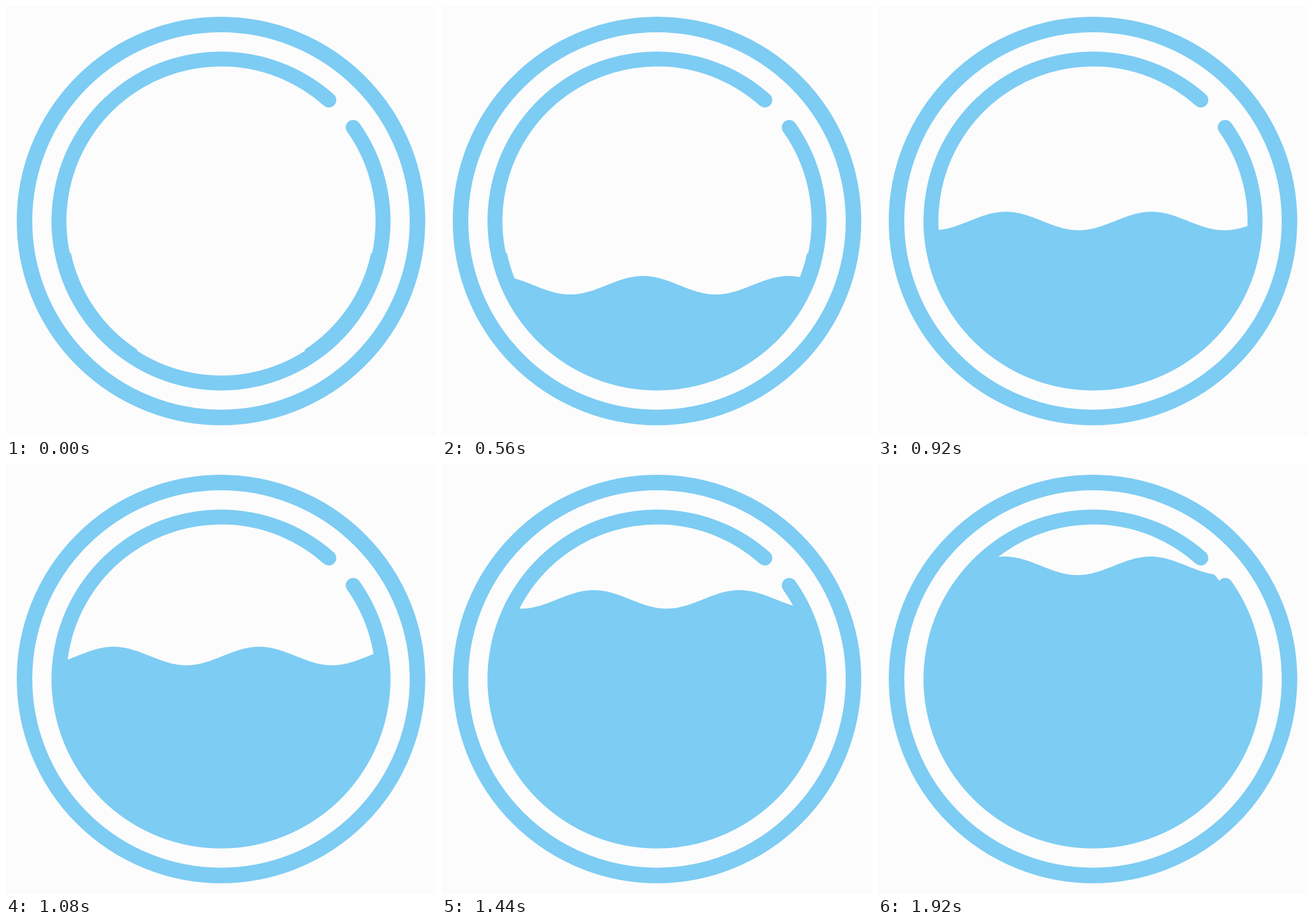
Recreate the animation shown at these times as an HTML page with a canvas. Size 720x720 px, loop 2920 ms.

```html
<!DOCTYPE html>
<html lang="en">
<head>
<meta charset="utf-8">
<title>Filling porthole</title>
<style>
  html, body { margin: 0; width: 100%; height: 100%; overflow: hidden; background: #fcfcfc; }
  canvas { display: block; width: 100vmin; height: 100vmin; }
</style>
</head>
<body>
<canvas id="stage" width="720" height="720"></canvas>
<script>
const ctx = document.getElementById('stage').getContext('2d');
const BLUE = '#7dccf3', PAPER = '#fcfcfc';
const LOOP = 2920, STEP = 40, START = 240, END = 1920;
const CENTER = 360, WAVELENGTH = 244, AMPLITUDE = 15.5;

// Path of one wave crest; velocities vx, vy are in pixels per step.
const path = [
  { t: 240,  x: 450, y: 568, vx: -15,   vy: -15 },
  { t: 320,  x: 420, y: 538, vx: -15,   vy: -15 },
  { t: 760,  x: 273, y: 388, vx: -12.5, vy: -12 },
  { t: 1080, x: 180, y: 306, vx: 0,     vy: -9.5 },
  { t: 1280, x: 217, y: 253, vx: 9,     vy: -11.5 },
  { t: 1600, x: 267, y: 180, vx: -3,    vy: -6.2 },
  { t: 1920, x: 212, y: 155, vx: 0,     vy: 0 }
];

function hermite(p0, v0, p1, v1, u) {
  const u2 = u * u, u3 = u2 * u;
  return p0 * (2 * u3 - 3 * u2 + 1) + v0 * (u3 - 2 * u2 + u)
       + p1 * (3 * u2 - 2 * u3) + v1 * (u3 - u2);
}

function crestAt(t) {
  const i = Math.max(1, path.findIndex(p => t <= p.t));
  const a = path[i - 1], b = path[i];
  const u = (t - a.t) / (b.t - a.t), steps = (b.t - a.t) / STEP;
  return {
    x: hermite(a.x, a.vx * steps, b.x, b.vx * steps, u),
    y: hermite(a.y, a.vy * steps, b.y, b.vy * steps, u)
  };
}

function ring(radius, width, from = 0, to = 360, cap = 'butt') {
  const rad = Math.PI / 180;
  ctx.beginPath();
  ctx.arc(CENTER, CENTER, radius, from * rad, to * rad);
  ctx.lineWidth = width;
  ctx.lineCap = cap;
  ctx.stroke();
}

function water(crest) {
  ctx.save();
  ctx.beginPath();
  ctx.arc(CENTER, CENTER, 268, 0, Math.PI * 2);
  ctx.clip();
  ctx.beginPath();
  ctx.moveTo(80, 640);
  for (let x = 80; x <= 640; x += 2) {
    const phase = (x - crest.x) / WAVELENGTH * Math.PI * 2;
    ctx.lineTo(x, crest.y + AMPLITUDE * (1 - Math.cos(phase)));
  }
  ctx.lineTo(640, 640);
  ctx.fill();
  ctx.restore();
}

function draw(time) {
  const t = Math.floor((time % LOOP) / STEP) * STEP;
  ctx.fillStyle = PAPER;
  ctx.fillRect(0, 0, 720, 720);
  ctx.fillStyle = ctx.strokeStyle = BLUE;
  ring(329, 26);
  ring(271.3, 25, -35.3, 311.7, 'round');
  // The lower sides of the inner ring are slightly thicker.
  ring(259, 4, 12, 57);
  ring(259, 4, 123, 168);
  if (t >= START) water(crestAt(Math.min(t, END)));
}

const begin = performance.now();
function tick() {
  draw(performance.now() - begin);
  requestAnimationFrame(tick);
}
tick();
</script>
</body>
</html>
```
